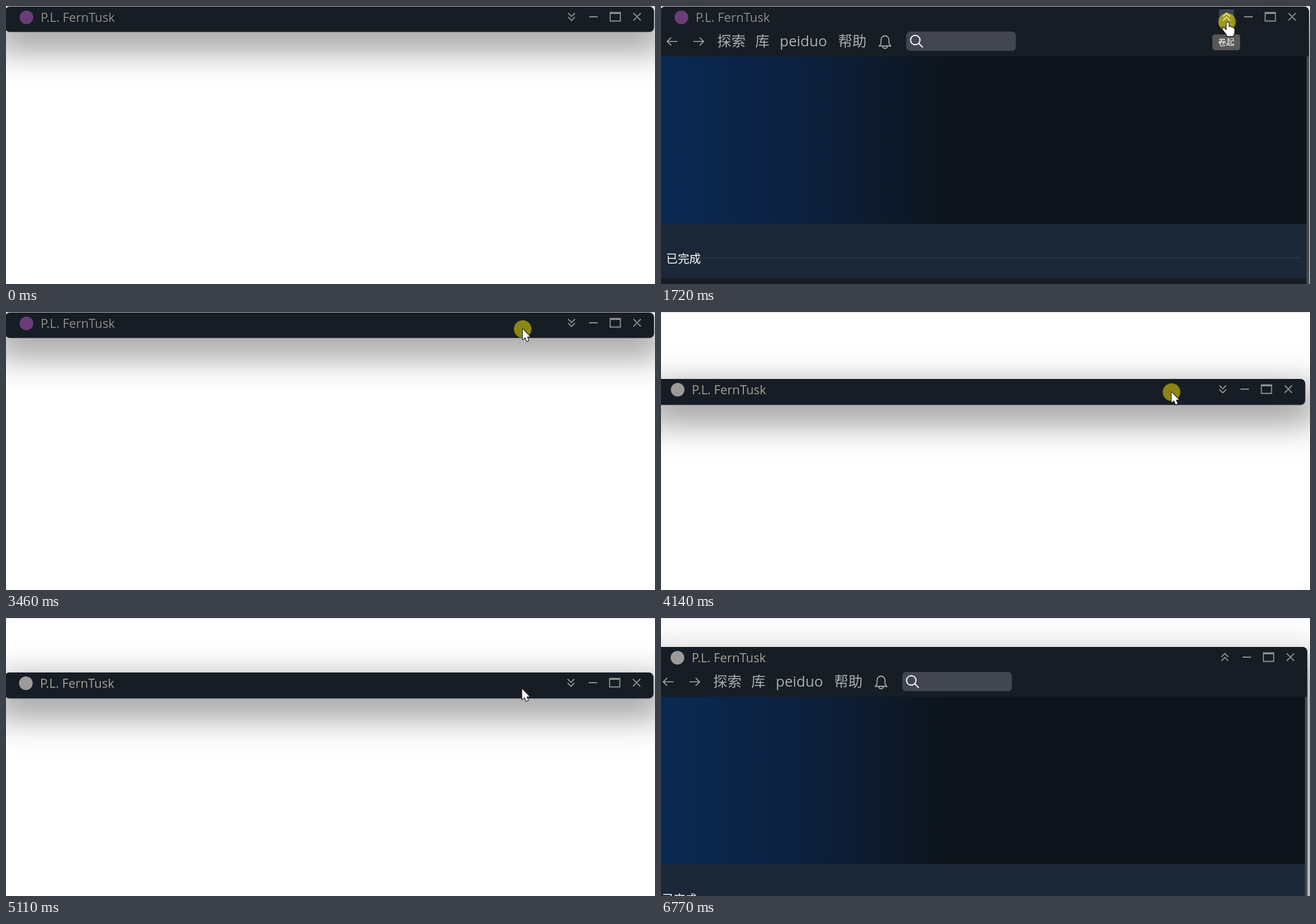
Write an HTML page with a canvas that moves like this. It is 1143 by 490 pixels and loops after 6970 ms.

```html
<!DOCTYPE html>
<html lang="zh">
<head>
<meta charset="utf-8">
<style>
  html, body { margin: 0; width: 1143px; height: 490px; overflow: hidden; background: #fff; }
  canvas { display: block; }
</style>
</head>
<body>
<canvas id="stage" width="1143" height="490"></canvas>
<script>
const c = document.getElementById('stage').getContext('2d');
const LOOP = 6970;
const LAG = 70;   // the dragged window trails the pointer by this much
const FONT = '"Open Sans", "Noto Sans CJK SC", "Noto Sans CJK", sans-serif';

const within = (t, ...spans) => spans.some(([a, b]) => t >= a && t < b);
const progress = (t, a, b) => Math.min(1, Math.max(0, (t - a) / (b - a)));
const ease = (t, a, b) => (1 - Math.cos(Math.PI * progress(t, a, b))) / 2;
const swing = (t, a, b) => Math.sin(Math.PI * progress(t, a, b)) ** 2;   // out and back

const isOpen = t => within(t, [1240, 1790], [2600, 2860], [5380, LOOP]);
const isHover = t => within(t, [900, 1990]);
const isPressed = t => within(t, [1170, 1240], [1720, 1790], [3460, 4970], [5450, 6770]);

// Two clockwise drags: down and back up a little, then further up.
function dragOffset(t) {
  return {
    x: -18 * swing(t, 3950, 4900) - ease(t, 3590, 4900) - 34 * swing(t, 5450, 6770) - 6 * ease(t, 5450, 6770),
    y: 122 * ease(t, 3590, 4060) - 27 * ease(t, 3990, 4500) - 45.5 * ease(t, 5450, 6770)
  };
}

function pointerAt(t) {
  if (t < 900) {
    const k = Math.sin(progress(t, 200, 830) * Math.PI / 2);
    const bend = (a, b, d) => a * (1 - k) ** 2 + 2 * b * k * (1 - k) + d * k * k;
    return { x: bend(1083, 905, 1005), y: bend(464, 150, 36) };
  }
  const away = ease(t, 1990, 2400);
  const drag = dragOffset(t + LAG);
  return { x: 997 - 87 * away + drag.x, y: 28 + 2 * away + drag.y };
}

function rect(color, x, y, w, h, r = 0) {
  c.fillStyle = color;
  c.beginPath();
  c.roundRect(x, y, w, h, r);
  c.fill();
}

function disc(color, x, y, r) {
  c.fillStyle = color;
  c.beginPath();
  c.arc(x, y, r, 0, 7);
  c.fill();
}

function stroke(color, width, d) {
  c.strokeStyle = color;
  c.lineWidth = width;
  c.stroke(new Path2D(d));
}

function text(str, x, y, size, color) {
  c.font = `${size}px ${FONT}`;
  c.fillStyle = color;
  c.fillText(str, x, y);
}

function shadow(x, y, w, h, alpha) {
  const far = 3000, spread = 22;   // the caster stays off stage, only its shadow is seen
  c.save();
  c.shadowColor = `rgba(0,0,0,${alpha})`;
  c.shadowBlur = 66;
  c.shadowOffsetX = far;
  c.shadowOffsetY = 22;
  rect('#000', x - spread - far, y, w + 2 * spread, h);
  c.restore();
}

function drawPage(width) {
  const ink = '#a9adb0';
  stroke(ink, 1.7, 'M29 62.5H11M18 55.5l-7 7l7 7M57 62.5H75M68 55.5l7 7l-7 7');
  text('探索', 99, 71, 25, ink);
  text('库', 166, 71, 25, ink);
  text('peiduo', 209, 71, 25.6, ink);
  text('帮助', 312, 71, 25, ink);
  stroke(ink, 1.8, 'M384.5 70.5h20l-3-5V60c0-10-14-10-14 0v5.5zM390.5 71c.5 5 7.5 5 8 0');
  rect('#424650', 432, 45, 193, 34, 7);
  disc('#fff', 447.8, 60, 9.3);
  disc('#424650', 447.8, 60, 7.3);
  stroke('#fff', 2, 'M454 66l7 7');

  const glow = c.createLinearGradient(0, 0, 520, 0);
  glow.addColorStop(0, '#0a2a53');
  glow.addColorStop(.45, '#0c2141');
  glow.addColorStop(1, '#0d141b');
  rect(glow, -50, 89, width + 50, 295);
  rect('#1c2837', -50, 384, width + 50, 95);
  rect('#434951', width - 4, 89, 4, 600);
  rect('#36414d', 70, 443, 1056, 1);
  text('已完成', 9, 453, 20.4, '#fff');
}

function drawButtons(open, hover) {
  if (hover) rect('#3d4450', 983, 6, 26, 29);
  const ink = '#90928f';
  const chevron = open ? 'l6 -6l6 6' : 'l6 6l6 -6';
  const y = open ? 18.5 : 12.5;
  stroke(hover ? '#e4e4e0' : ink, 1.9, `M990 ${y}${chevron}M990 ${y + 7}${chevron}`);
  stroke(ink, 1.8, 'M1027 19h15M1064 11.5h18v15h-18zM1064 13h18M1105 12.5l13 13M1118 12.5l-13 13');
}

function drawWindow(t) {
  const drag = dragOffset(t);
  const top = Math.round(drag.y);
  const grow = 4 * ease(t, 5450, 6770);
  const open = isOpen(t), moved = top > 0;
  const x = drag.x - 1, y = top + 1, w = 1142 + grow, h = open ? 700 : 44.5 + ease(t, 3590, 4060);

  shadow(x, y, w, h, open ? .38 : .58);
  rect('rgba(70,70,75,.6)', x - .8, y, w + 1.6, h + .8, 9);
  rect('#171d25', x, y, w, h, 8);

  c.save();
  c.beginPath();
  c.roundRect(x, y, w, h, 8);
  c.clip();
  c.translate(drag.x, top);
  disc(moved ? '#9c9b9a' : '#6b3d78', 36, 20, 12);
  text('P.L. FernTusk', 61, 28, 21.8, moved ? '#a3a294' : '#8d8e88');
  if (open) drawPage(1141 + grow);
  c.translate(grow, 0);
  drawButtons(open, isHover(t));
  c.restore();

  if (open && within(t, [1500, 1790])) {
    rect('#585858', 971, 50, 49, 28, 5);
    text('卷起', 981, 69.3, 14.6, '#fff');
  }
}

const ARROW = new Path2D('M0 0V18.5L4.3 14.6L7.2 21.5L10.6 20.1L7.7 13.4H13Z');
const HAND = new Path2D('M-1 3C-1 0 3 0 3 3V9C5 7.5 7 8.5 7 10C9 9 10.5 10 10.5 11.5C12 11 13 12 13 14' +
  'V18C13 21 11 22 11 25H0C0 22 -3 20 -5 17L-8 13C-9 11 -6 10 -4 12L-1 15Z');

function drawPointer(t) {
  if (!within(t, [200, 6770])) return;
  const { x, y } = pointerAt(t);
  if (isPressed(t)) disc('rgba(255,240,0,.5)', x, y, 15.5);
  const shape = isHover(t) ? HAND : ARROW;
  c.save();
  c.translate(x, y);
  c.lineJoin = 'round';
  c.lineWidth = 2;
  c.strokeStyle = '#111';
  c.stroke(shape);
  c.fillStyle = '#fff';
  c.fill(shape);
  c.restore();
}

function frame(now) {
  const t = now % LOOP;
  rect('#fff', 0, 0, 1143, 490);
  rect('#dcdcdc', 0, 0, 1143, 1);
  drawWindow(t);
  drawPointer(t);
  requestAnimationFrame(frame);
}
requestAnimationFrame(frame);
</script>
</body>
</html>
```
